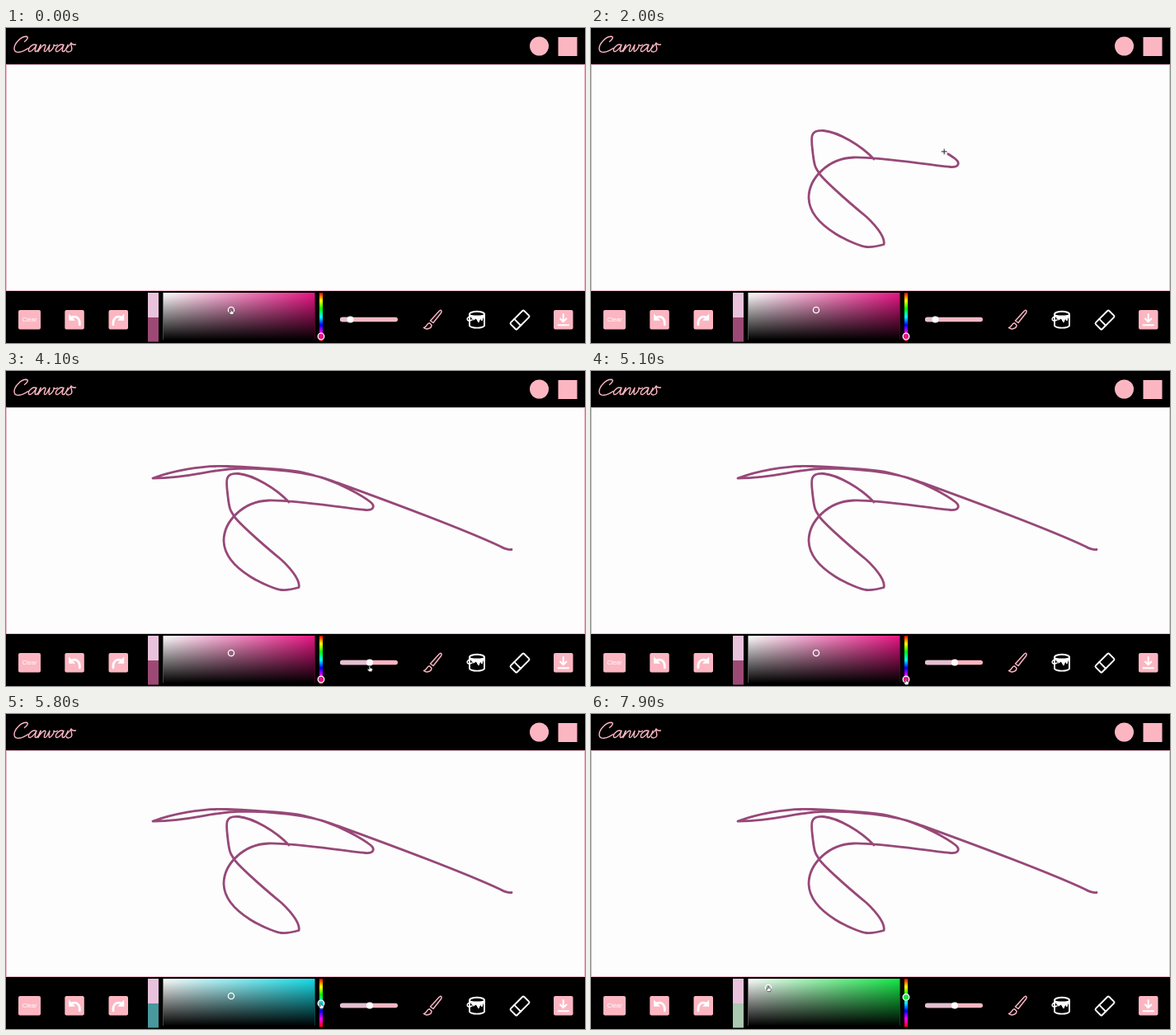
These frames come from a looping animation (702 by 382 pixels, 8000 ms). An HTML page:

```html
<!DOCTYPE html>
<html lang="en">
<head>
<meta charset="utf-8">
<title>Canvas</title>
<style>
  html, body { margin: 0; width: 100%; height: 100%; overflow: hidden; background: #000; }
  svg { display: block; width: 100vw; height: 100vh; }
  .pink { fill: #fbb6c2; }
  .line { fill: none; stroke-linecap: round; stroke-linejoin: round; }
  text { font: 7.6px "Liberation Sans", Arial, sans-serif; fill: #fff; text-anchor: middle; }
</style>
</head>
<body>
<svg viewBox="0 0 702 382">
  <defs>
    <linearGradient id="saturation">
      <stop stop-color="#fff"/>
      <stop id="pureHue" offset="1"/>
    </linearGradient>
    <linearGradient id="darkness" x2="0" y2="1">
      <stop stop-opacity="0"/>
      <stop offset="1"/>
    </linearGradient>
    <linearGradient id="hues" x2="0" y2="1"></linearGradient>
    <g id="turn">
      <rect class="pink" width="23.5" height="23.5" rx="2"/>
      <path class="line" stroke="#fff" stroke-width="2.8" stroke-linecap="butt" d="M7 9.4C13 6 18.6 9.5 18 17.8"/>
      <path fill="#fff" d="M4.8 4.6V12.8H12.8Z"/>
    </g>
  </defs>

  <rect width="702" height="382"/>
  <rect x=".5" y="44.5" width="701" height="274" fill="#fdfdfd" stroke="#efb9cb"/>

  <!-- script lettering -->
  <g class="line" stroke="#fbb6c2" stroke-width="1.4" role="img" aria-label="Canvas">
    <path d="M22.5 16.5C26 14 28 10.5 24.5 10.3C18 10.3 9.5 19 10 25.5C10.5 31.5 19 30 27 24.5"/>
    <path id="letterA" d="M36.5 20.5C32 18.5 26.5 24.5 27.5 27.8C29 30.5 34.5 25.5 37 20.5C35.5 24.5 34 28.8 36.5 28.5C39 28 41 23.5 42 20.5"/>
    <path d="M42 20.5L38.8 28.7C41.5 24 45.5 19.8 47.5 20.3C49.5 21 44.5 28 47 28.6C49.5 28.8 51.5 23.5 53 20.5C52.3 24 51.3 28 52.5 28.6C55.5 27.5 58.5 23 58 20.3C59 22 61 21.5 62.5 20.5"/>
    <use href="#letterA" x="33"/>
    <path d="M73 25C76 22 78 20 79 18C78 22.5 82 25.5 78.5 28C76 29.6 73 29 73.5 27.5M79 18.5C80.5 20 82.5 20.5 84.5 20"/>
  </g>
  <circle class="pink" cx="646.5" cy="22" r="11.5"/>
  <rect class="pink" x="669.5" y="11" width="23" height="23"/>

  <path id="stroke" class="line" stroke="#974878" stroke-width="2.8" d="M343 159
    C328 143 300 126 282 124.5S267 134 269 152S273 170 276.5 176S306 206 334 229
    C349 243 357 256 355 262.5C350 264 342 266 334 265.5S265 243 264 206
    C264 182 288 158 318 157S400 165 436 168.5
    C447 169 447 163 442 159S405 133 360 123
    C340 119 300 117 268 115.5S200 122 178 130
    C230 129 240 120 285 118C320 118 365 122 395 133S545 187 600 213Q607 217 613 216.5"/>

  <rect class="pink" x="15" y="342" width="27" height="23.5" rx="2"/>
  <text x="28.5" y="356.3">Clear</text>
  <use href="#turn" x="71.3" y="342"/>
  <use href="#turn" transform="translate(148 342) scale(-1 1)"/>

  <rect x="172" y="321" width="13" height="30" fill="#e9c2dc"/>
  <rect id="swatch" x="172" y="351" width="13" height="29.5"/>
  <rect x="190.5" y="321" width="184" height="57" fill="url(#saturation)"/>
  <rect x="190.5" y="321" width="184" height="57.3" fill="url(#darkness)"/>
  <circle id="picker" r="3.6" fill="none" stroke="#fff" stroke-width="1.3"/>
  <rect x="380" y="321" width="4" height="58.5" fill="url(#hues)"/>
  <circle id="hueKnob" cx="382" r="3.8" stroke="#fff" stroke-width="1.3"/>

  <rect class="pink" x="405" y="350.8" width="70" height="5.4" rx="2.7"/>
  <rect id="filled" x="405" y="350.8" height="5.4" rx="2.7" fill="#e3bfcf"/>
  <circle id="thumb" cy="353.5" r="4" fill="#fff"/>

  <!-- brush, bucket, eraser, download -->
  <g class="line" stroke="#fbb6c2" stroke-width="1.5">
    <path d="M514.5 355L525.5 343C527.5 341.5 529 343 527.5 345.5L518 357.5Z"/>
    <path d="M513.5 357.8C510 358 510.5 362.5 506.5 363.5C509.5 366 516 365 516 360.2Z"/>
  </g>
  <g class="line" stroke="#fff" stroke-width="1.9">
    <ellipse cx="571" cy="347" rx="9" ry="3.2"/>
    <path d="M562 347V361C564 364.5 578 364.5 580 361V347"/>
    <path d="M562 350C557 352 559 357 565 354" stroke-width="1.5"/>
    <path fill="#fff" stroke-width="1" d="M563 349H579L577 355L575 352L573 357L570 352L567 354Z"/>
    <g transform="translate(623 354) rotate(-45)">
      <rect x="-11.5" y="-5.5" width="23" height="11" rx="1.5"/>
      <path d="M-4 -5.5V5.5"/>
    </g>
  </g>
  <rect class="pink" x="664" y="342" width="23.5" height="23.5" rx="2"/>
  <path class="line" stroke="#fff" stroke-width="2" d="M675.7 347V355.5M672 352.5L675.7 356.3L679.4 352.5M669.5 360.3H682"/>

  <path id="cross" class="line" stroke="#222" stroke-width="1" d="M-3 0H3M0 -3V3"/>
  <path id="hand" fill="#fff" stroke="#333" stroke-width=".7" stroke-linejoin="round"
    d="M-.8 -1.8C-.6 -2.6 .5 -2.6 .6 -1.8V.2L2.8 .8Q3.6 1.2 3.2 2.4L2.4 4.6H-.8L-2.8 2Q-2.8 .8 -.8 1.8Z"/>
</svg>
<script>
const LOOP = 8000, STEP = 100;
const $ = id => document.getElementById(id);
const set = (id, attrs) => {
  for (const name in attrs) $(id).setAttribute(name, attrs[name]);
};

const progress = (t, from, to) => Math.max(0, Math.min(1, (t - from) / (to - from)));
const easeOut = k => 1 - (1 - k) ** 2;
const mix = (a, b, k) => a + (b - a) * k;
const glide = (t, from, to, a, b) => mix(a, b, easeOut(progress(t, from, to)));

const SLIDE = [3700, 4100], HUE_DRAG = [5400, 6200], PICK = 6800;
const DRAW = [1300, 2600], STROKE_LENGTH = $("stroke").getTotalLength();

const moves = [
  { time: [0, 500], x: 440, y: 364 },
  { time: [500, 900], x: 345, y: 233 },
  { time: [900, 1100], x: 343, y: 159 },
  { time: [DRAW[1], DRAW[1]], x: 613, y: 217 },
  { time: [2700, 3500], x: 417, y: 359 },
  { time: SLIDE, x: 441, y: 360 },
  { time: [4200, 5100], x: 382, y: 376 },
  { time: HUE_DRAG, x: 382, y: 345 },
  { time: [6350, 6600], x: 246, y: 345 },
  { time: [7200, 7900], x: 215, y: 332 }
];

function cursorAt(t, drawn) {
  if (t > DRAW[0] && t < DRAW[1]) return $("stroke").getPointAtLength(drawn + 6);
  let x = 273, y = 343;
  for (const move of moves) {
    if (t < move.time[0]) break;
    x = glide(t, ...move.time, x, move.x);
    y = glide(t, ...move.time, y, move.y);
  }
  return { x, y };
}

function hsv(h, s, v) {
  const channel = n => {
    const k = (n + h / 60) % 6;
    return Math.round(255 * v * (1 - s * Math.max(0, Math.min(k, 4 - k, 1))));
  };
  return `rgb(${channel(5)},${channel(3)},${channel(1)})`;
}

function render(t) {
  const drawn = STROKE_LENGTH * progress(t, ...DRAW) ** 1.27;
  const cursor = cursorAt(t, drawn);
  const slider = glide(t, ...SLIDE, 417.5, 441);
  const hueY = glide(t, ...HUE_DRAG, 374, 343.3);
  const picked = t < PICK ? { x: 273, y: 342 } : cursor;
  const hue = (hueY - 322) / 57 * 360;
  const pure = hsv(hue, 0.91, 0.91);

  set("stroke", {
    "stroke-dasharray": `${drawn} ${STROKE_LENGTH + 10}`,
    visibility: drawn ? "visible" : "hidden"
  });
  set("pureHue", { "stop-color": pure });
  set("hueKnob", { cy: hueY, fill: pure });
  set("picker", { cx: picked.x, cy: picked.y });
  set("swatch", { fill: hsv(hue, (picked.x - 190) / 184 * 1.18, 1 - (picked.y - 320) / 57) });
  set("thumb", { cx: slider });
  set("filled", { width: slider - 405 });

  const overCanvas = cursor.y > 45 && cursor.y < 318;
  const transform = `translate(${cursor.x} ${cursor.y})`;
  set("cross", { transform, visibility: overCanvas ? "visible" : "hidden" });
  set("hand", { transform, visibility: overCanvas ? "hidden" : "visible" });
}

for (let i = 0; i <= 6; i++) {
  $("hues").innerHTML += `<stop offset="${i / 6}" stop-color="${hsv(i * 60, 1, 1)}"/>`;
}

const start = performance.now();
function tick() {
  const t = (performance.now() - start) % LOOP;
  render(Math.floor(t / STEP) * STEP);
  requestAnimationFrame(tick);
}
tick();
</script>
</body>
</html>
```
